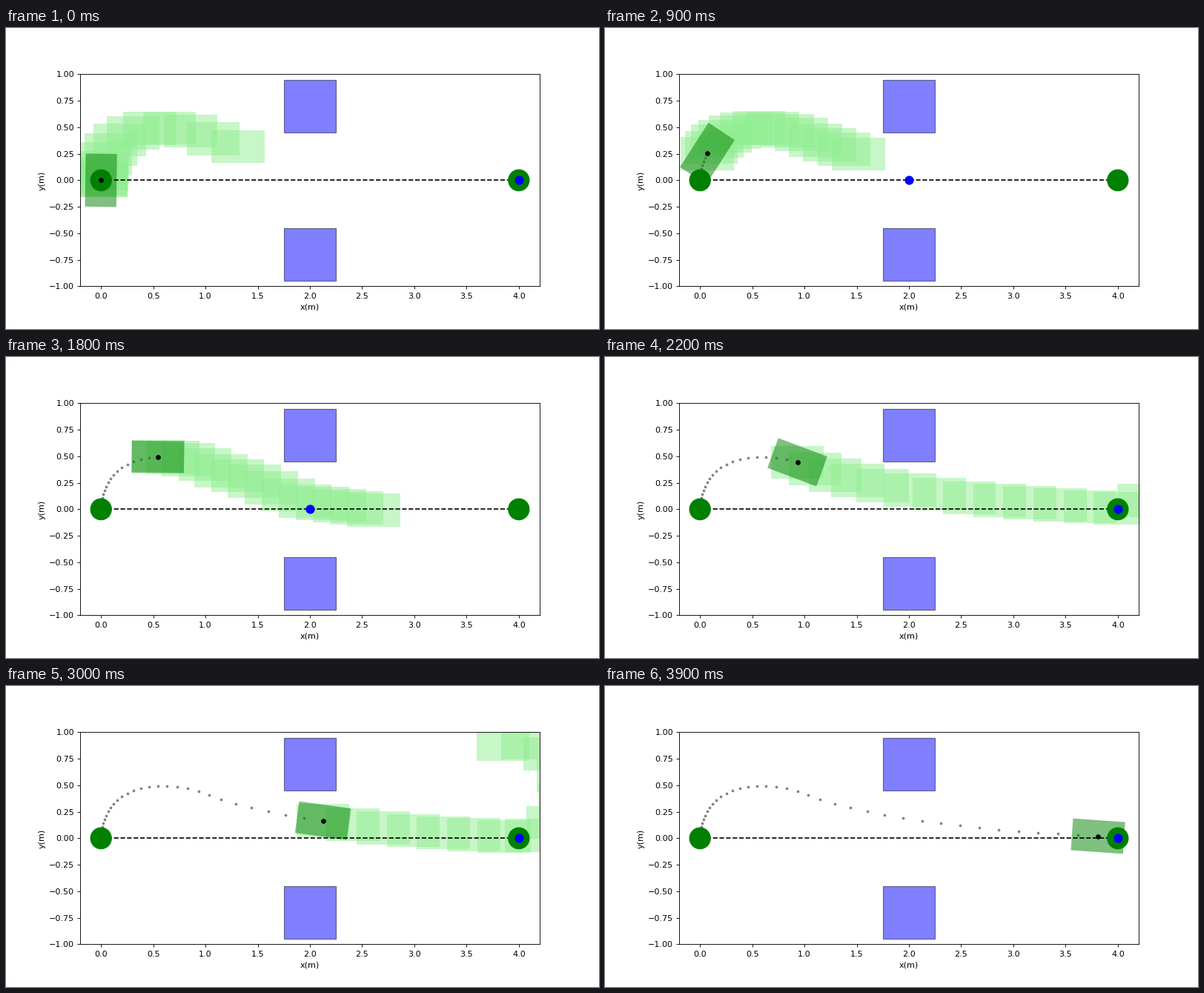
Animation, 800 px wide and 406 px high, one loop 4000 ms. Source, as a matplotlib script:

```python
import numpy as np
import matplotlib.pyplot as plt
from matplotlib.animation import FuncAnimation
from matplotlib.patches import Circle, Rectangle

W, H, DPI = 800, 406, 80
FRAMES, INTERVAL = 40, 100
CAR = np.array([0.5, 0.3])
BOX = np.array([0.508, 0.312])
HORIZON = 14           # boxes in each plan
NEAR, FAR = 2.0, 4.0   # the two goals on the line
RETARGET = 21          # step at which the far goal is chosen again
LOOP_R = 0.45          # turning circle planned behind the far goal
FINE = 10              # route samples per step

# Way stations of the drive: step, x, y
STATIONS = np.array([
    (0, 0, 0), (2, .001, .025), (5, .013, .11), (9, .07, .252),
    (13, .197, .392), (18, .545, .495), (22, .932, .444), (24, 1.148, .364),
    (26, 1.44, .287), (32, 2.49, .119), (40, FAR, .007)])


def spline(t, knots, pts):
    """Cubic Hermite curve through pts at the given knots."""
    slope = np.gradient(pts, knots, axis=0)
    i = np.clip(np.searchsorted(knots, t, side="right") - 1, 0, len(knots) - 2)
    h = (knots[i + 1] - knots[i])[:, None]
    u = (t - knots[i])[:, None] / h
    return ((2 * u**3 - 3 * u**2 + 1) * pts[i]
            + (u**3 - 2 * u**2 + u) * h * slope[i]
            + (3 * u**2 - 2 * u**3) * pts[i + 1]
            + (u**3 - u**2) * h * slope[i + 1])


drive = spline(np.arange(FRAMES * FINE + 1) / FINE, STATIONS[:, 0],
               STATIONS[:, 1:])
path = drive[::FINE]

# The planned route is the drive plus a slower circle behind the goal
turn = np.linspace(0, 2 * np.pi, 200)[1:]
circle = np.column_stack([FAR + LOOP_R * np.sin(turn),
                          0.46 - LOOP_R * np.cos(turn)])
route = np.vstack([drive, circle])
lengths = np.hypot(*np.diff(route, axis=0).T)
lengths[len(drive) - 1:] /= 0.83
along = np.concatenate([[0], np.cumsum(lengths)])
travelled = along[:len(drive):FINE]


def is_near(t):
    return 1 <= t < RETARGET


def plan(t):
    """Box centres: speed up from the present pace along the route."""
    top = 0.12 + 0.0025 * t if is_near(t) else 0.29
    start = 1.7 * (travelled[t] - travelled[max(t - 1, 0)])
    steps = np.minimum(start + top * np.arange(HORIZON - 1) / HORIZON, top)
    s = travelled[t] + np.concatenate([[0], np.cumsum(steps)])
    x, y = (np.interp(s, along, axis) for axis in route.T)
    if is_near(t):
        y -= 0.23 * np.clip(x - 1.2, 0, 0.7) ** 2   # dip to the near goal
    return np.column_stack([x, y])


fig = plt.figure(figsize=(W / DPI, H / DPI), dpi=DPI, facecolor="white")
ax = fig.add_axes([0.125, 57.6 / H, 0.775, 286 / H])
ax.set(xlim=(-0.2, 4.2), ylim=(-1, 1), xlabel="x(m)", ylabel="y(m)",
       xticks=np.arange(0, 4.1, 0.5), yticks=np.arange(-1, 1.1, 0.25))
ax.tick_params(axis="x", pad=4)

for y in (0.45, -0.95):
    ax.add_patch(Rectangle((1.75, y), 0.5, 0.5, fc="blue", ec="black",
                           lw=1, alpha=0.5))
for x in (0, FAR):
    ax.add_patch(Circle((x, 0), 0.1, color="green", lw=1, zorder=3))
ax.plot([0, FAR], [0, 0], "k--", lw=1.5, zorder=2)

boxes = [ax.add_patch(Rectangle((0, 0), *BOX, fc="lightgreen", lw=0,
                                alpha=0.5, zorder=0.9))
         for _ in range(HORIZON)]
trail, = ax.plot([], [], "o", color="gray", ms=2.3, zorder=0.95)
car = ax.add_patch(Rectangle((0, 0), *CAR, rotation_point="center",
                             fc="green", lw=0, alpha=0.5, zorder=1))
target, = ax.plot([], [], "o", color="blue", ms=10, zorder=4)
centre, = ax.plot([], [], "o", color="black", ms=5, zorder=5)


def update(t):
    pos = path[t]
    dx, dy = path[t + 1] - pos
    car.set_xy(pos - CAR / 2)
    car.set_angle(np.degrees(np.arctan2(dy, dx)))
    centre.set_data([pos[0]], [pos[1]])
    trail.set_data(path[:t, 0], path[:t, 1])
    target.set_data([NEAR if is_near(t) else FAR], [0])
    for box, point in zip(boxes, plan(t)):
        box.set_xy(point - BOX / 2)
        box.set_visible(t < FRAMES - 1)   # no plan once arrived
    return [*boxes, trail, car, target, centre]


anim = FuncAnimation(fig, update, frames=FRAMES, interval=INTERVAL,
                     init_func=lambda: update(0), repeat=True, repeat_delay=0)
plt.show()
```
